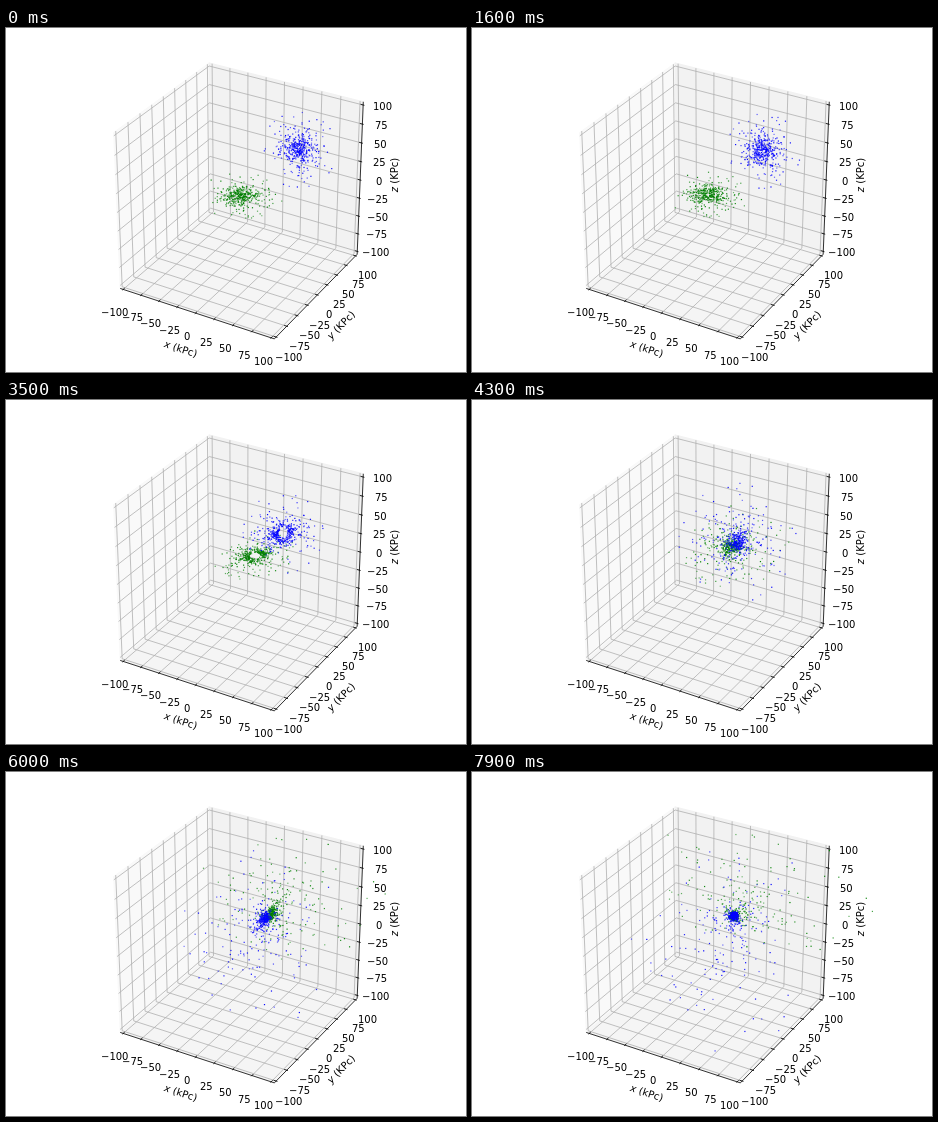
An HTML page with a canvas for the animation above (8000 ms loop, 460x344 px).

```html
<!DOCTYPE html>
<html lang="en">
<head>
<meta charset="utf-8">
<title>Two merging clusters</title>
<style>
  html, body { margin: 0; width: 100%; height: 100%; overflow: hidden; background: #fff; }
  svg, canvas { position: absolute; left: 0; top: 0; width: 460px; height: 344px; }
  text { font: 10px "DejaVu Sans", sans-serif; fill: #000; }
  .label { text-anchor: middle; }
  .var { font-style: oblique; }
  .grid { stroke: #b0b0b0; stroke-width: .8; fill: none; }
  .axis { stroke: #000; stroke-width: .8; fill: none; }
</style>
</head>
<body>
<svg id="plot" viewBox="0 0 460 344"></svg>
<canvas id="dots" width="460" height="344"></canvas>
<script>
const LOOP = 8000, STEP = 100;
const EDGE = 100 * 25 / 24;   // pane border in data units
const GAP = EDGE + 17;        // tick label distance
const plot = document.getElementById('plot');

// Perspective view: elevation 30, azimuth -60, eye distance 10
function project([x, y, z]) {
  const s = 1708 / (10 * 200 - (.433 * x - .75 * y + .5 * z));
  return [234.6 + s * (.866 * x + .5 * y),
          168 - s * (-.25 * x + .433 * y + .866 * z)];
}

function add(name, attrs, text = '') {
  const el = document.createElementNS('http://www.w3.org/2000/svg', name);
  for (const key in attrs) el.setAttribute(key, attrs[key]);
  el.textContent = text;
  plot.append(el);
  return el;
}

const path = (points, attrs) =>
  add('path', { d: 'M' + points.map(p => project(p).map(v => v.toFixed(2))).join('L'), ...attrs });

function pane(points, grey) {
  const fill = `rgb(${grey},${grey},${grey})`;
  path([...points, points[0]], { fill, stroke: fill });
}

function tickLabel(point, value) {
  const [x, y] = project(point);
  const el = add('text', { y: Math.round(y + 7.2) }, String(value).replace('-', '\u2212'));
  el.setAttribute('x', Math.round(x - .5 - el.getComputedTextLength() / 2));
}

function axisLabel(letter, unit, x, y, angle) {
  const el = add('text', { class: 'label', transform: `translate(${x} ${y}) rotate(${angle})`, y: 3.5 });
  const variable = document.createElementNS(el.namespaceURI, 'tspan');
  variable.setAttribute('class', 'var');
  variable.textContent = letter;
  el.append(variable, ` (${unit})`);
}

function drawAxes() {
  const M = EDGE;
  pane([[-M, -M, -M], [-M, M, -M], [-M, M, M], [-M, -M, M]], 249);
  pane([[-M, M, -M], [M, M, -M], [M, M, M], [-M, M, M]], 242);
  pane([[-M, -M, -M], [M, -M, -M], [M, M, -M], [-M, M, -M]], 245);

  // Each axis: grid line, axis point at a given outward shift, label spot
  const axes = [
    { grid: t => [[t, -M, -M], [t, M, -M], [t, M, M]],
      at: (t, d = 0) => [t, -M - d, -M], label: t => [t, -GAP, -GAP] },
    { grid: t => [[M, t, -M], [-M, t, -M], [-M, t, M]],
      at: (t, d = 0) => [M + d, t, -M], label: t => [GAP, t, -GAP] },
    { grid: t => [[-M, -M, t], [-M, M, t], [M, M, t]],
      at: (t, d = 0) => [M + d, M, t], label: t => [GAP, GAP, t] }
  ];
  const ticks = Array.from({ length: 9 }, (_, i) => i * 25 - 100);
  for (const a of axes) for (const t of ticks) path(a.grid(t), { class: 'grid' });
  for (const a of axes) {
    path([a.at(-M), a.at(M)], { class: 'axis' });
    for (const t of ticks) {
      path([a.at(t, 1.67), a.at(t, -3.33)], { class: 'axis' });
      tickLabel(a.label(t), t);
    }
  }
  axisLabel('x', 'kPc', 174.8, 320.8, 18);
  axisLabel('y', 'KPc', 335, 297, -45.3);
  axisLabel('z', 'KPc', 388.6, 147, -90);
}

// size: disc scale in px; tails: where loose stars end up after the encounter
const CENTER = [262, 144];
const clusters = [
  { color: '#008000', count: 410, start: [-27, 24], size: [7, 3.8], spin: 1, lobe: .5,
    tails: [[68, -14], [-10, -46]] },
  { color: '#0000ff', count: 440, start: [31, -22], size: [6.3, 6.3], spin: -1, lobe: .8,
    tails: [[-38, 36], [12, -16], [2, 80]] }
];

let seed = 20417;
function random() {
  seed = (seed + 0x6D2B79F5) | 0;
  let v = Math.imul(seed ^ seed >>> 15, 1 | seed);
  v ^= v + Math.imul(v ^ v >>> 7, 61 | v);
  return ((v ^ v >>> 14) >>> 0) / 4294967296;
}

const mix = (a, b, u) => a + (b - a) * u;
const hump = (t, peak, width) => Math.exp(-(((t - peak) / width) ** 2));
const ramp = (v, from, to) => Math.min(1, Math.max(0, (v - from) / (to - from)));
const smooth = (v, from, to) => { const u = ramp(v, from, to); return u * u * (3 - 2 * u); };

for (const c of clusters)
  c.stars = Array.from({ length: c.count }, (_, i) => {
    const radius = Math.min(6, -Math.log((1 - random()) * (1 - random())));
    return {
      radius,
      angle: random() * 2 * Math.PI,
      alpha: .5 + .5 * random(),
      loose: smooth(radius, 1.3, 3.6),
      tail: c.tails[i % c.tails.length],
      reach: .4 + .85 * random()
    };
  });

// Distance factor of the cores: fall, pass through, settle (t in seconds)
const approach = t =>
  Math.cos(Math.PI / 2 * (t / 4.55) ** 1.5) * Math.exp(-((Math.max(0, t - 4.55) / 1.1) ** 2));

const ctx = document.getElementById('dots').getContext('2d');

function drawCluster({ color, start, size, spin, lobe, stars }, t) {
  const k = approach(t);
  const settle = smooth(t, 3, 6);
  const fling = Math.sin(Math.PI / 2 * ramp(t, 4.2, 8));
  const halo = 2.4 * smooth(t, 3, 6);
  const [sx, sy] = size.map(s => mix(s, 3, settle));
  const lean = .7 * hump(t, 5.8, 1.3);
  // A five-knot ring early on, then two turning lobes
  const ring = hump(t, .9, .5), lobes = .8 * hump(t, 3, .9);
  const lobeAngle = lobe - .97 * (t - 2.4);

  ctx.fillStyle = color;
  for (const s of stars) {
    const pinch = Math.max(ring, lobes) * .75 * (1 - .8 * s.loose);
    const r = mix(s.radius, 1.6, pinch) * (1 + halo * s.loose);
    let a = s.angle + spin * t * 1.1 / (.5 + s.radius);
    a -= .2 * ring * Math.sin(5 * a + s.radius * s.loose);
    a -= .5 * lobes * Math.sin(2 * (a - lobeAngle));
    let x = r * sx * Math.cos(a), y = r * sy * Math.sin(a);
    const along = lean * (1 - s.loose) * (.45 * x - .89 * y);
    x += .45 * along;
    y -= .89 * along;
    const push = s.loose * s.reach * fling;
    ctx.globalAlpha = s.alpha;
    ctx.fillRect(CENTER[0] + k * start[0] + x + push * s.tail[0] - .6,
                 CENTER[1] + k * start[1] + y + push * s.tail[1] - .6, 1.2, 1.2);
  }
}

function drawStars(t) {
  ctx.clearRect(0, 0, 460, 344);
  for (const c of clusters) drawCluster(c, t / 1000);
}

drawAxes();
const begin = performance.now();
let shown = -1;
function tick() {
  const t = Math.floor((performance.now() - begin) % LOOP / STEP) * STEP;
  if (t !== shown) drawStars(shown = t);
  requestAnimationFrame(tick);
}
tick();
</script>
</body>
</html>
```
